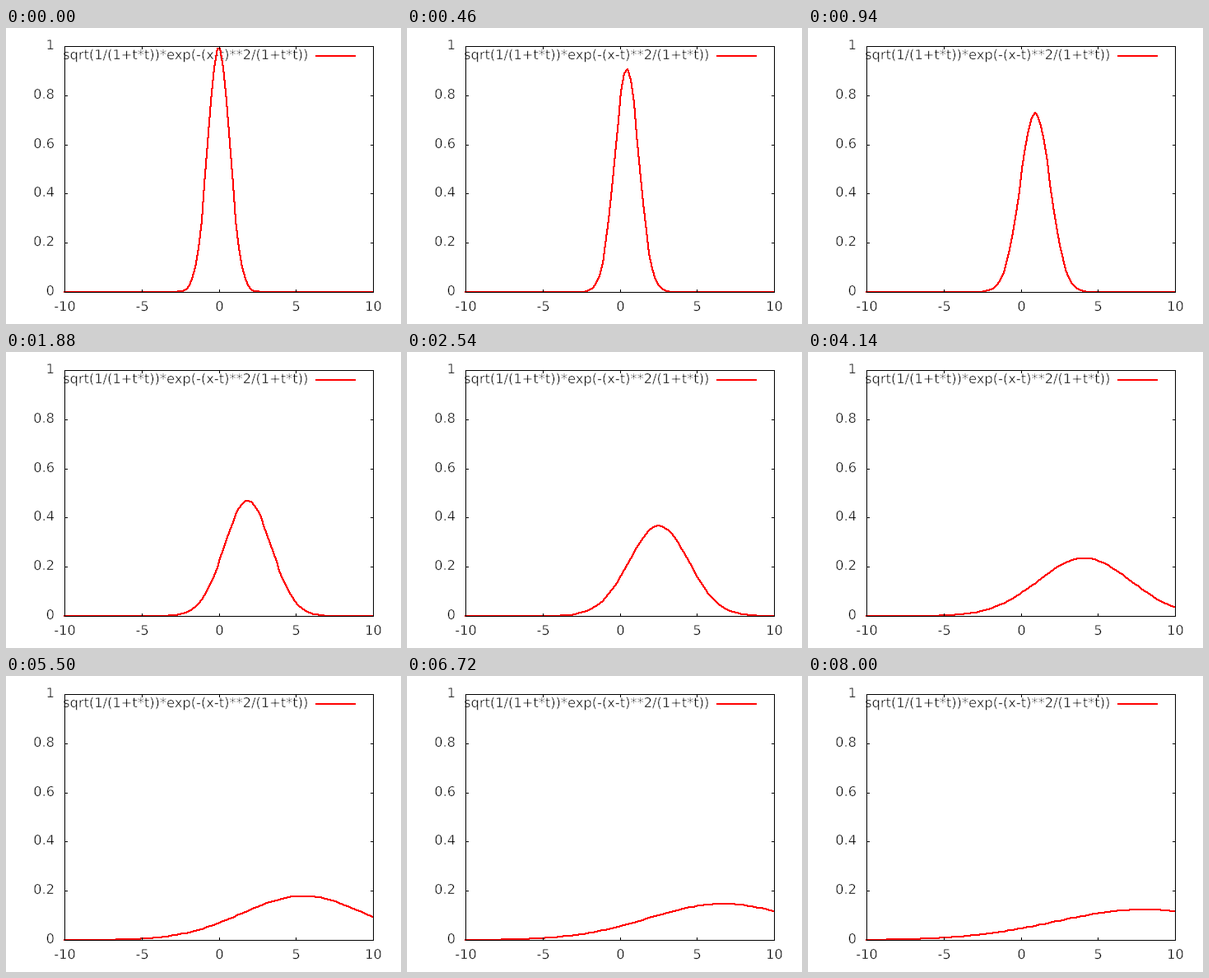
Write a matplotlib script that moves like this. It is 480 px wide and 360 px high and loops after 8020 ms.

```python
import numpy as np
import matplotlib.pyplot as plt
from matplotlib.animation import FuncAnimation
from matplotlib.patches import Rectangle
from matplotlib.patheffects import Stroke
from matplotlib.transforms import Affine2D

W, H, DPI = 480, 360, 100
LEFT, RIGHT, TOP, BOTTOM = 71, 446, 22, 321
FRAMES, INTERVAL = 401, 20
SAMPLES, TICK = 100, 4
RED = (255, 0, 0, 255)

plt.rcParams["font.family"] = "DejaVu Sans"
fig = plt.figure(figsize=(W / DPI, H / DPI), dpi=DPI, facecolor="white")
pixels = Affine2D().scale(1 / W, -1 / H).translate(0, 1) + fig.transFigure
# A white outline thins the letters to a light weight
thin = [Stroke(linewidth=0.36, foreground="white")]


def fill(x, y, w, h, color="black"):
    fig.add_artist(Rectangle((x, y), w, h, fc=color, lw=0, transform=pixels,
                             antialiased=False, zorder=3))


def label(x, baseline, text, ha):
    fig.text(x, baseline, text, ha=ha, va="baseline", size=16.25 * 72 / DPI,
             color="black", transform=pixels, path_effects=thin, zorder=1)


def map_x(x):
    return np.floor(LEFT + (x + 10) / 20 * (RIGHT - LEFT) + 0.5).astype(int)


def map_y(y):
    return BOTTOM - np.floor(y * (BOTTOM - TOP) + 0.5).astype(int)


def line_pixels(x0, y0, x1, y1):
    """Integer line, stepping along its longer axis."""
    if abs(y1 - y0) > abs(x1 - x0):
        ys, xs = line_pixels(y0, x0, y1, x1)
        return xs, ys
    if x0 > x1:
        x0, y0, x1, y1 = x1, y1, x0, y0
    dx, dy = x1 - x0, y1 - y0
    k = np.arange(dx + 1)
    step = (2 * k * abs(dy) + dx) // max(2 * dx, 1)
    return x0 + k, y0 + np.sign(dy) * step


def draw_axes():
    fill(LEFT, TOP, RIGHT - LEFT + 1, 1)
    fill(LEFT, BOTTOM, RIGHT - LEFT + 1, 1)
    fill(LEFT, TOP, 1, BOTTOM - TOP + 1)
    fill(RIGHT, TOP, 1, BOTTOM - TOP + 1)
    for v in (-10, -5, 0, 5, 10):
        x = int(map_x(v))
        fill(x, TOP, 1, TICK)
        fill(x, BOTTOM - TICK + 1, 1, TICK)
        label(x + 0.5, 344, str(v), "center")
    for v in (0, 0.2, 0.4, 0.6, 0.8, 1):
        y = int(map_y(v))
        fill(LEFT, y, TICK, 1)
        fill(RIGHT - TICK + 1, y, TICK, 1)
        label(59, y + 4, f"{v:g}", "right")


def draw_key():
    label(366, 38, "sqrt(1/(1+t*t))*exp(-(x-t)**2/(1+t*t))", "right")
    fill(376, 33, 49, 2, "#ff0000")


xs = np.linspace(-10, 10, SAMPLES)
cols = map_x(xs)


def render(t):
    spread = 1 + t * t
    rows = map_y(np.sqrt(1 / spread) * np.exp(-(xs - t) ** 2 / spread))
    img = np.zeros((H, W, 4), np.uint8)
    parts = [line_pixels(*p) for p in zip(cols, rows, cols[1:], rows[1:])]
    px, py = (np.concatenate(p) for p in zip(*parts))
    # 2 x 2 pen
    for ox in (0, 1):
        for oy in (0, 1):
            img[py - oy, px - ox] = RED
    return img


draw_axes()
draw_key()
curve = fig.figimage(render(0), origin="upper", zorder=2)


def update(i):
    curve.set_data(render(i * INTERVAL / 1000))
    return (curve,)


anim = FuncAnimation(fig, update, frames=FRAMES, interval=INTERVAL,
                     repeat=True, repeat_delay=0, blit=False)
plt.show()
```
